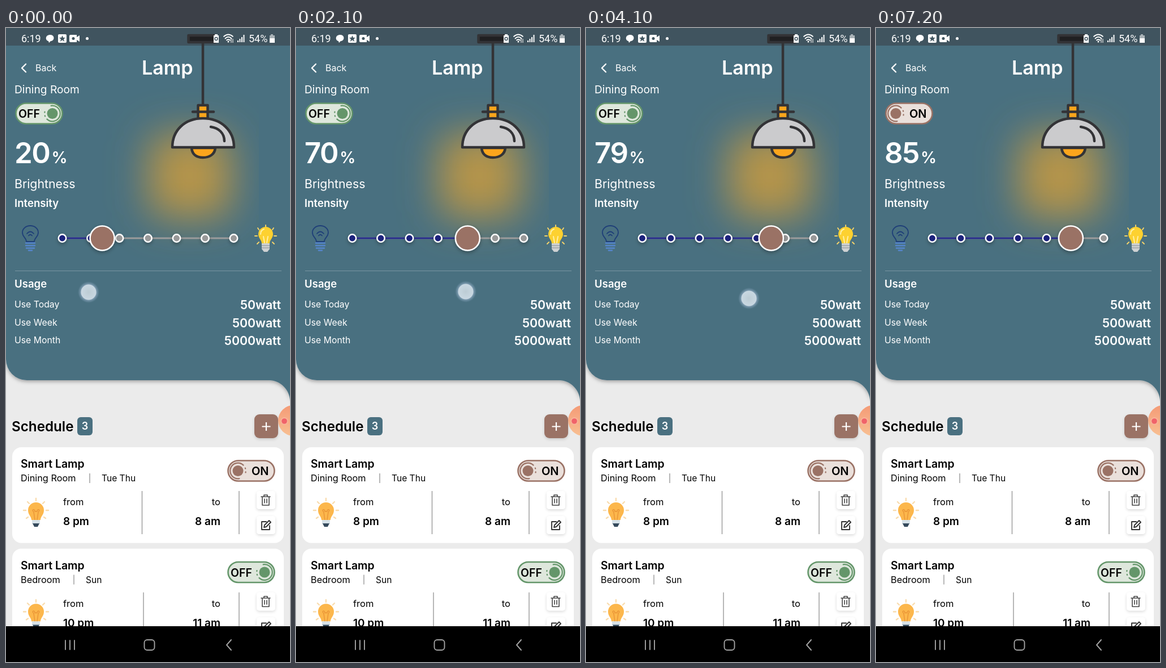
Write an HTML page that moves like this. It is 502x1116 px and loops after 8000 ms.

```html
<!DOCTYPE html>
<html lang="en">
<head>
<meta charset="utf-8">
<title>Lamp</title>
<style>
html, body { margin: 0; width: 100%; height: 100%; overflow: hidden; background: #ebebeb; }
svg { display: block; width: 100%; height: 100%; font-family: Inter, "Open Sans", sans-serif; }
.b { font-weight: 600; }
.end { text-anchor: end; }
.line { fill: none; stroke-linecap: round; stroke-linejoin: round; }
.status { font-family: Roboto, sans-serif; font-size: 18px; }
</style>
</head>
<body>
<svg viewBox="0 0 502 1116" preserveAspectRatio="none">
  <defs>
    <radialGradient id="halo">
      <stop offset=".68" stop-color="#b0c4da" stop-opacity=".65"/>
      <stop offset="1" stop-color="#8fabc8" stop-opacity="0"/>
    </radialGradient>
    <radialGradient id="touchFill">
      <stop offset="0" stop-color="#bcccd4"/>
      <stop offset="1" stop-color="#c9d8e2"/>
    </radialGradient>
    <linearGradient id="peach" x2="0" y2="1">
      <stop stop-color="#f49a76"/><stop offset="1" stop-color="#f8c093"/>
    </linearGradient>
    <filter id="blur" x="-100%" y="-100%" width="300%" height="300%">
      <feGaussianBlur stdDeviation="34"/>
    </filter>
    <filter id="shade" x="-30%" y="-100%" width="160%" height="300%">
      <feDropShadow dx="0" dy="2.5" stdDeviation="3" flood-opacity=".32"/>
    </filter>
    <filter id="soft" x="-30%" y="-30%" width="160%" height="170%">
      <feDropShadow dx="0" dy="2" stdDeviation="2.5" flood-opacity=".15"/>
    </filter>
    <clipPath id="glowArea"><path d="M100 31H447V427H100Z"/></clipPath>

    <g id="trash" class="line" stroke="#444" stroke-width="1.6">
      <path d="M-8-6H8M-3-6V-9H3V-6M-6-6V9H6V-6M-2-2V5M2-2V5"/>
    </g>
    <g id="edit" class="line" stroke="#333" stroke-width="1.9">
      <path d="M1-6H-7V8H7V1M-3 4L-2 0 6-8 9-5 1 3Z"/>
    </g>
    <g id="cardBulb">
      <path class="line" stroke="#f9dcae" stroke-width="2.4" d="M0-25V-21M-15-19L-12-16M15-19L12-16M-22-4H-18M22-4H18M-17 10L-14 8M17 10L14 8"/>
      <path fill="#fcb74c" d="M-8 13C-8 7-14 4-14-4A14 14 0 0 1 14-4C14 4 8 7 8 13Z"/>
      <path class="line" stroke="#e99335" stroke-width="1.4" d="M-2 13L-4-1C-9-5-2-8-2-2H2C2-8 9-5 4-1L2 13"/>
      <path fill="#d7e2e8" d="M-7 13H7V20H-7Z"/>
      <path fill="#354a5c" d="M-6 19H6L3 25H-3Z"/>
    </g>
  </defs>

  <path filter="url(#shade)" fill="#4a7080" d="M0-20H502V657C502 637 485 620 465 620H37A37 37 0 0 1 0 583Z"/>
  <g clip-path="url(#glowArea)">
    <rect x="252" y="186" width="146" height="148" rx="30" fill="#b5944a" filter="url(#blur)"/>
  </g>
  <path fill="#40545f" d="M0 0H502V31H0Z"/>

  <!-- hanging lamp -->
  <g stroke="#333336" stroke-width="4.5" stroke-linejoin="round" stroke-linecap="round">
    <path d="M322.500 13H370V25H322.500Z" fill="#202022"/>
    <path d="M348 27V135"/>
    <path d="M339.500 136H356.500V160H339.500Z" fill="#fba51c"/>
    <path d="M330 147.500H367"/>
    <path d="M328 211C329 223 337 228 348 228S369 223 370 211Z" fill="#fba51c"/>
    <path d="M294 210C294 180 316 159 348 159S403 180 403 210Z" fill="#cbcbcd"/>
    <path d="M362 174C376 176 386 185 386 199" fill="none"/>
  </g>

  <!-- status bar -->
  <g fill="#fff">
    <text class="status" x="27" y="25">6:19</text>
    <path d="M78 12C87 12 86 23 79 23L76 26 75 23C69 22 69 12 78 12Z"/>
    <rect x="92" y="11" width="15" height="15" rx="2"/>
    <path fill="#40545f" d="M99.500 13L101 17H105L102 19.500 103 24 99.500 21 96 24 97 19.500 94 17H98Z"/>
    <path d="M114 12H125V16L130 13V24L125 21V25H114Q112 25 112 23V14Q112 12 114 12Z"/>
    <circle cx="119" cy="18.500" r="2.500" fill="#40545f"/>
    <circle cx="143.500" cy="18.500" r="2.500"/>
    <path d="M367 13H369V11H374V13H376V26H367Z"/>
    <circle cx="371.500" cy="19" r="2.500" fill="none" stroke="#40545f" stroke-width="1.500"/>
    <path class="line" stroke="#fff" stroke-width="1.800" d="M385 15Q393 8 401 15M387.500 18.500Q393 13 398.500 18.500M390 21.500Q393 19 396 21.500"/>
    <circle cx="393" cy="24" r="1.500"/>
    <path d="M398 19V26M401 19V26" stroke="#ddd" stroke-width="1.300"/>
    <path d="M409 22H411V25H409ZM412.500 19H414.500V25H412.500ZM416 16H418V25H416ZM419.500 12H421.500V25H419.500Z"/>
    <text class="status" x="429" y="25">54%</text>
    <path opacity=".55" d="M466 13H468V11H472V13H475V19H466Z"/>
    <path d="M466 18H475V26H466Z"/>
  </g>

  <!-- header -->
  <g fill="#fff">
    <path class="line" stroke="#fff" stroke-width="2.400" d="M35 63.500L28 70.500 35 77.500"/>
    <text x="52" y="76" font-size="16">Back</text>
    <text class="b" x="240" y="82" font-size="34">Lamp</text>
    <text x="15" y="115" font-size="19.200">Dining Room</text>
    <text class="b" x="15" y="238" font-size="51" letter-spacing="-1.500"><tspan id="percent"></tspan><tspan font-size="28" letter-spacing="0" dx="3">%</tspan></text>
    <text x="15" y="282" font-size="21.300">Brightness</text>
    <text class="b" x="15" y="315" font-size="18.600">Intensity</text>
    <path d="M16 427.500H487" stroke="#7895a1" stroke-width="1.200"/>
    <text class="b" x="15" y="457" font-size="18.600">Usage</text>
    <g id="usage"></g>
  </g>
  <g id="mainToggle"></g>

  <!-- dim and bright bulbs -->
  <g class="line" stroke="#1f3f78" stroke-width="1.800">
    <path d="M36 376C36 369 29 368 29 360A14 12 0 0 1 57 360C57 368 50 369 50 376ZM37 362Q43 355 49 362M40 365.500Q43 362 46 365.500"/>
    <path stroke="#5585cc" stroke-width="2.500" d="M35 378.500H51M35 383H51M36 387.500H50M40 391.500H46"/>
  </g>
  <path class="line" stroke="#f3d36a" stroke-width="2" d="M459 347V350M445 352L447 355M473 352L471 355M440 366H444M474 366H478M444 380L447 377M474 380L471 377"/>
  <path fill="#fdd130" d="M452 379C452 373 446 370 446 363A13 13 0 0 1 472 363C472 370 466 373 466 379Z"/>
  <path class="line" stroke="#fff0a5" stroke-width="2" d="M450 363Q450 356 456 354M457 378L455 367M461 378L463 367"/>
  <path fill="#cfd2d3" d="M452 379H466V389L462 394H456L452 389Z"/>
  <path stroke="#9da3a6" stroke-width="1.300" d="M452 383H466M452 387H466"/>

  <!-- intensity slider -->
  <g>
    <path d="M99 370H402" stroke="#9b9b9b" stroke-width="3"/>
    <path id="track" stroke="#252b8c" stroke-width="3"/>
    <g id="stops" stroke="#fff" stroke-width="2.500" filter="url(#shade)"></g>
    <circle id="knob" cy="370" r="21.500" fill="#9a7265" stroke="#fff" stroke-width="2.500" filter="url(#shade)"/>
  </g>

  <!-- schedule -->
  <text class="b" x="10" y="710" font-size="24.200">Schedule</text>
  <rect x="126" y="685" width="27" height="32" rx="6" fill="#4a7080"/>
  <text class="b" x="139.500" y="707" font-size="18" fill="#fff" text-anchor="middle">3</text>
  <rect x="439" y="680" width="42" height="42" rx="9" fill="#9a7265" filter="url(#soft)"/>
  <path d="M452.500 701.500H467.500M460 694V709" stroke="#fff" stroke-width="2.200"/>
  <g id="cards"></g>
  <circle cx="508" cy="691" r="27" fill="url(#peach)"/>
  <circle cx="492" cy="692" r="7" fill="#f8b497"/>
  <circle cx="492" cy="692" r="4.800" fill="#f0626a"/>

  <!-- navigation bar -->
  <path d="M0 1053H502V1116H0Z"/>
  <g class="line" stroke="#a2a2a2" stroke-width="1.900">
    <path d="M105 1078V1094M113 1078V1094M121 1078V1094M398 1077L390 1086 398 1095"/>
    <rect x="244.500" y="1077" width="18" height="18" rx="5"/>
  </g>

  <g id="touch">
    <circle r="19" fill="url(#halo)"/>
    <circle r="13.500" fill="url(#touchFill)"/>
  </g>
</svg>

<script>
const $ = id => document.getElementById(id);
const GREEN = [100, 150, 106], BROWN = [154, 114, 101];
const PERIOD = 8000, STEP = 100;
const stops = Array.from({ length: 7 }, (_, i) => 99.5 + i * 50.5);

// Keyframes: time, values...
const levels = [[0, 20], [200, 15], [1200, 47.3], [1700, 75], [2100, 70], [2600, 100], [2900, 97],
  [3500, 92], [3800, 95], [4100, 79], [4500, 52], [4800, 53], [5000, 62.9], [5400, 88], [5800, 85.4]];
const touches = [[0, 146, 465], [200, 137, 470], [1200, 238, 461], [1700, 324, 466], [2100, 300, 464],
  [2600, 382, 458], [2900, 368, 455], [3500, 355, 460], [3700, 356, 465], [4100, 288, 476],
  [4400, 252, 490], [4700, 254, 497], [5000, 300, 478], [5400, 372, 477], [5800, 354, 478]];

const lerp = (a, b, u) => a + (b - a) * u;
const clamp = v => Math.max(0, Math.min(1, v));
const smooth = v => { const u = clamp(v); return u * u * (3 - 2 * u); };

function sample(keys, t) {
  const i = keys.findIndex(k => k[0] > t);
  if (i < 0) return keys.at(-1).slice(1);
  const a = keys[i - 1], b = keys[i], u = smooth((t - a[0]) / (b[0] - a[0]));
  return a.slice(1).map((v, j) => lerp(v, b[j + 1], u));
}

// Pill switch at (x, y); on runs from 0 (right, green) to 1 (left, brown)
function toggle(x, y, on) {
  const mix = GREEN.map((g, i) => lerp(g, BROWN[i], on));
  const color = `rgb(${mix})`;
  const pale = `rgb(${mix.map((v, i) => lerp(v, [255, 253, 250][i], .79))})`;
  return `<g transform="translate(${x} ${y})">
    <rect x="1.5" y="1.5" width="82" height="36" rx="18" fill="${pale}" stroke="${color}" stroke-width="2.6"/>
    <text class="b" x="6" y="27" font-size="19.5" opacity="${clamp(1 - on * 2)}">OFF</text>
    <text class="b" x="43" y="27" font-size="20" opacity="${clamp(on * 2 - 1)}">ON</text>
    <g transform="translate(${lerp(66, 19, on)} 19.5) rotate(${on * 180})" stroke="${color}">
      <circle r="9.5" fill="${color}" stroke="none"/>
      <circle r="13.8" fill="none" stroke-width="2.2" stroke-linecap="round"
        stroke-dasharray="56 6 1 6 1 17" transform="rotate(-100)"/>
    </g></g>`;
}

function card(y, room, roomEnd, days, from, to, column, on) {
  const button = (by, icon) => `<rect x="443" y="${by}" width="33" height="32" rx="5" fill="#fff"
    filter="url(#soft)"/><use href="#${icon}" x="459" y="${by + 16}"/>`;
  return `<g transform="translate(0 ${y})">
    <rect x="11" width="480" height="168.500" rx="16" fill="#fff"/>
    <text class="b" x="26" y="36" font-size="19.400">Smart Lamp</text>
    <text x="26" y="60" font-size="16.300">${room}</text>
    <text x="${roomEnd + 21}" y="60" font-size="15.600">${days}</text>
    <path d="M${roomEnd} 46V63M${column} 77V153M412 77V153" stroke="#999" stroke-width="1.400"/>
    <use href="#cardBulb" x="53" y="115"/>
    <text x="101" y="102" font-size="16.500">from</text>
    <text class="b" x="101" y="137" font-size="19">${from}</text>
    <text class="end" x="379" y="102" font-size="16.500">to</text>
    <text class="b end" x="379" y="137" font-size="19">${to}</text>
    ${button(77, 'trash')}${button(121, 'edit')}${toggle(391, 22, on)}</g>`;
}

$('usage').innerHTML = [['Today', 50], ['Week', 500], ['Month', 5000]].map(([name, watt], i) =>
  `<text x="15" y="${492 + i * 31.5}" font-size="15.800">Use ${name}</text>
   <text class="b end" x="486" y="${495 + i * 31.5}" font-size="21.300">${watt}watt</text>`).join('');
$('stops').innerHTML = stops.map(x => `<circle cx="${x}" cy="370" r="6.700"/>`).join('');
$('cards').innerHTML =
  card(738, 'Dining Room', 148, 'Tue Thu', '8 pm', '8 am', 240.5, 1) +
  card(916.5, 'Bedroom', 120, 'Sun', '10 pm', '11 am', 243, 0);

function render(t) {
  const [level] = sample(levels, t);
  const knobX = 116.8 + level * 2.665;
  $('percent').textContent = Math.round(level);
  $('knob').setAttribute('cx', knobX);
  $('track').setAttribute('d', `M99 370H${knobX}`);
  [...$('stops').children].forEach((dot, i) =>
    dot.setAttribute('fill', stops[i] <= knobX ? '#1c237c' : '#999'));

  const tapping = t >= 6300;
  const [x, y] = tapping ? [86, 157] : sample(touches, t);
  $('touch').setAttribute('transform', `translate(${x} ${y})`);
  $('touch').setAttribute('opacity', t < 5800 || (tapping && t < 6500) ? 1 : 0);
  $('mainToggle').innerHTML = toggle(16, 131, smooth((t - 6400) / 500));
}

function frame(now) {
  render(Math.floor(now % PERIOD / STEP) * STEP);
  requestAnimationFrame(frame);
}
requestAnimationFrame(frame);
</script>
</body>
</html>
```
